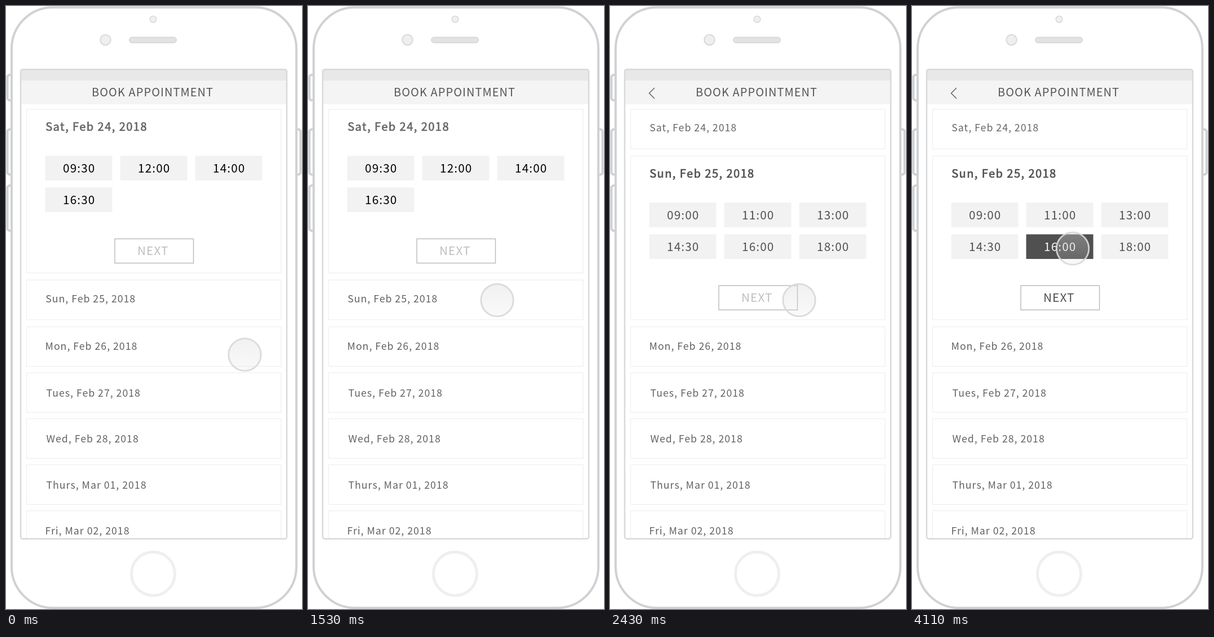
Animation, 525 px wide and 1068 px high, one loop 6450 ms. Source, as an HTML page:

```html
<!DOCTYPE html>
<html lang="en">
<head>
<meta charset="utf-8">
<title>Book appointment</title>
<style>
  html, body { margin: 0; width: 100%; height: 100%; overflow: hidden; background: #fff; }
  svg { display: block; width: 525px; height: 1068px; }
  text {
    font-family: "Noto Sans CJK JP", "Noto Sans CJK SC", "Noto Sans CJK", "Open Sans", sans-serif;
    font-size: 17.73px; letter-spacing: .0558em; fill: #626262; white-space: pre;
  }
  .title { font-size: 19.92px; fill: #555; }
  .time, .next { font-size: 20.7px; }
  .strong { letter-spacing: .0723em; stroke-width: .7px; }
  .next { fill: #bfbfbf; }
  .card { fill: #fff; stroke: #f0f0f0; stroke-width: 1.3; }
  .slot { fill: #f2f2f2; }
  .button { fill: #fff; stroke: #b9b9b9; stroke-width: 1.4; }
  .frame { fill: #fff; stroke: #d0d1d3; stroke-width: 4; }
</style>
</head>
<body>
<svg viewBox="0 0 525 1068">
  <defs>
    <clipPath id="screen"><rect x="26" y="112" width="472" height="831"/></clipPath>
    <clipPath id="fold"><rect x="26" y="174" width="472" height="382.3"/></clipPath>
    <linearGradient id="glass" x1="0" y1="0" x2="0" y2="1">
      <stop offset="0" stop-color="#d7d7d7" stop-opacity=".36"/>
      <stop offset="1" stop-color="#d7d7d7" stop-opacity=".14"/>
    </linearGradient>
  </defs>

  <g class="frame">
    <rect x="2.5" y="122" width="14" height="45" rx="4"/>
    <rect x="2.5" y="218.5" width="14" height="80" rx="4"/>
    <rect x="2.5" y="318" width="14" height="80" rx="4"/>
    <rect x="508.500" y="218.5" width="14" height="80" rx="4"/>
    <rect x="10" y="2.500" width="505" height="1063.5" rx="73"/>
  </g>
  <g fill="#efefef" stroke="#d9d9d9">
    <circle cx="261" cy="23.5" r="5.8" stroke-width="1.6"/>
    <circle cx="176.5" cy="60" r="9.3" stroke-width="2"/>
    <rect x="219" y="55.500" width="83" height="9.5" rx="4.7" fill="#e3e3e3" stroke-width="2"/>
  </g>
  <circle cx="261" cy="1005.5" r="38.5" fill="#fff" stroke="#efefef" stroke-width="5"/>

  <g clip-path="url(#screen)">
    <rect x="26" y="112" width="472" height="20.5" fill="#e8e8e8"/>
    <rect x="26" y="132.500" width="472" height="41.5" fill="#f4f4f4"/>
    <text class="title" x="152" y="160.4">BOOK APPOINTMENT</text>
    <path id="back" d="M79 145L69.500 154.500L79 164" fill="none" stroke="#666" stroke-width="1.5"/>
    <g id="days"></g>
    <g clip-path="url(#fold)" id="open"></g>
  </g>
  <rect x="26" y="112.200" width="472" height="831.5" rx="4" fill="none" stroke="#d9d9d9" stroke-width="2.5"/>

  <g id="touch">
    <circle r="28.7" fill="url(#glass)"/>
    <circle r="28.7" fill="none" stroke="#d8d8d8" stroke-width="2.8" stroke-opacity=".92"/>
  </g>
</svg>

<script>
const LOOP = 6450, STEP = 30;
const TAP = 2070, SLIDE = 2175, SLIDE_MS = 250, PICK = 4110;
const SMALL = 17.73, LARGE = 20.05, OPEN_H = 289.7, SHUT_H = 70.3;

const $ = id => document.getElementById(id);
const clamp = v => Math.max(0, Math.min(1, v));
const mix = (a, b, p) => a + (b - a) * p;

function add(parent, tag, attrs, text) {
  const el = document.createElementNS("http://www.w3.org/2000/svg", tag);
  for (const k in attrs) el.setAttribute(k, attrs[k]);
  if (text) el.textContent = text;
  parent.append(el);
  return el;
}
function set(el, attrs) {
  for (const k in attrs) el.setAttribute(k, attrs[k]);
}
const show = (el, on) => set(el, { visibility: on ? "visible" : "hidden" });

function addCard(parent, label, x) {
  const group = add(parent, "g");
  const box = add(group, "rect", { class: "card", x: 36.5, y: 0, width: 451.5, height: SHUT_H });
  const name = add(group, "text", { x, y: 40.4 }, label);
  return { group, box, name };
}

// Time slots and the button, placed relative to the card's top edge.
function addSlots(card, times, color) {
  const group = add(card.group, "g");
  const slots = times.map((time, i) => {
    const dx = i % 3 * 133, dy = Math.floor(i / 3) * 56.2;
    const box = add(group, "rect", { class: "slot", x: 69.5 + dx, y: 82.3 + dy, width: 119, height: 43.6 });
    const text = add(group, "text", { class: "time", x: 101 + dx, y: 111.7 + dy }, time);
    text.style.fill = color;
    return { box, text };
  });
  add(group, "rect", { class: "button", x: 193, y: 229.4, width: 139.5, height: 43 });
  const next = add(group, "text", { class: "next", x: 233, y: 257.9 }, "NEXT");
  return { group, slots, next };
}

function styleName(el, size, strong, color) {
  el.setAttribute("class", strong ? "strong" : "");
  el.style.fontSize = size + "px";
  el.style.fill = color;
  el.style.stroke = strong ? color : "none";
}

const sat = addCard($("days"), "Sat, Feb 24, 2018", 70.2);
const satSlots = addSlots(sat, ["09:30", "12:00", "14:00", "16:30"], "#000");
const sun = addCard($("open"), "Sun, Feb 25, 2018", 70.2);
const sunSlots = addSlots(sun, ["09:00", "11:00", "13:00", "14:30", "16:00", "18:00"], "#505050");

[["Mon, Feb 26, 2018", 69.5, 568], ["Tues, Feb 27, 2018", 71.5, 649.5],
 ["Wed, Feb 28, 2018", 71.5, 731], ["Thurs, Mar 01, 2018", 71.5, 812.5],
 ["Fri, Mar 02, 2018", 69.5, 894]].forEach(([label, x, y], i) => {
  const card = addCard($("days"), label, x);
  set(card.group, { transform: `translate(0 ${y})` });
  set(card.name, { y: i ? 42 : 40.8 });
});

// start, duration, from, to, ease-out power for x and y
const MOVES = [
  [885, 645, [423.5, 617.5], [335.5, 521], [1.57, 1.74]],
  [3405, 585, [335.5, 521], [285, 429.5], [1.97, 2.47]]
];

function touchAt(t) {
  const [start, ms, from, to, power] = MOVES[t < MOVES[1][0] ? 0 : 1];
  const left = 1 - clamp((t - start) / ms);
  return from.map((v, i) => mix(v, to[i], 1 - left ** power[i]));
}

function draw(t) {
  const open = t >= TAP, picked = t >= PICK;
  const p = clamp((t - SLIDE) / SLIDE_MS);
  const grow = clamp((p - .18) / .82);

  show($("back"), open);
  show(satSlots.group, !open);
  show(sunSlots.group, open);

  set(sat.group, { transform: "translate(0 183)" });
  set(sat.box, { height: mix(OPEN_H, SHUT_H, p) });
  set(sat.name, { y: open ? mix(39, 38.5, p) : 38.4 });
  styleName(sat.name, mix(LARGE, SMALL, grow), !open, "#666");

  set(sun.group, { transform: `translate(0 ${mix(485.3, 265.9, p)})` });
  set(sun.box, { height: open ? OPEN_H : SHUT_H });
  set(sun.name, { y: mix(39.4, 38.5, p) });
  styleName(sun.name, mix(SMALL, LARGE, grow), open, open ? "#505050" : "#626262");

  const slot = sunSlots.slots[4];
  slot.box.style.fill = picked ? "#505050" : "";
  slot.text.style.fill = picked ? "#f6f6f6" : "#505050";
  sunSlots.next.style.fill = picked ? "#505050" : "";

  set($("touch"), { transform: `translate(${touchAt(t).join(" ")})` });
}

const begin = performance.now();
function tick() {
  const t = (performance.now() - begin) % LOOP;
  draw(Math.floor(t / STEP) * STEP);
  requestAnimationFrame(tick);
}
draw(0);
requestAnimationFrame(tick);
</script>
</body>
</html>
```
